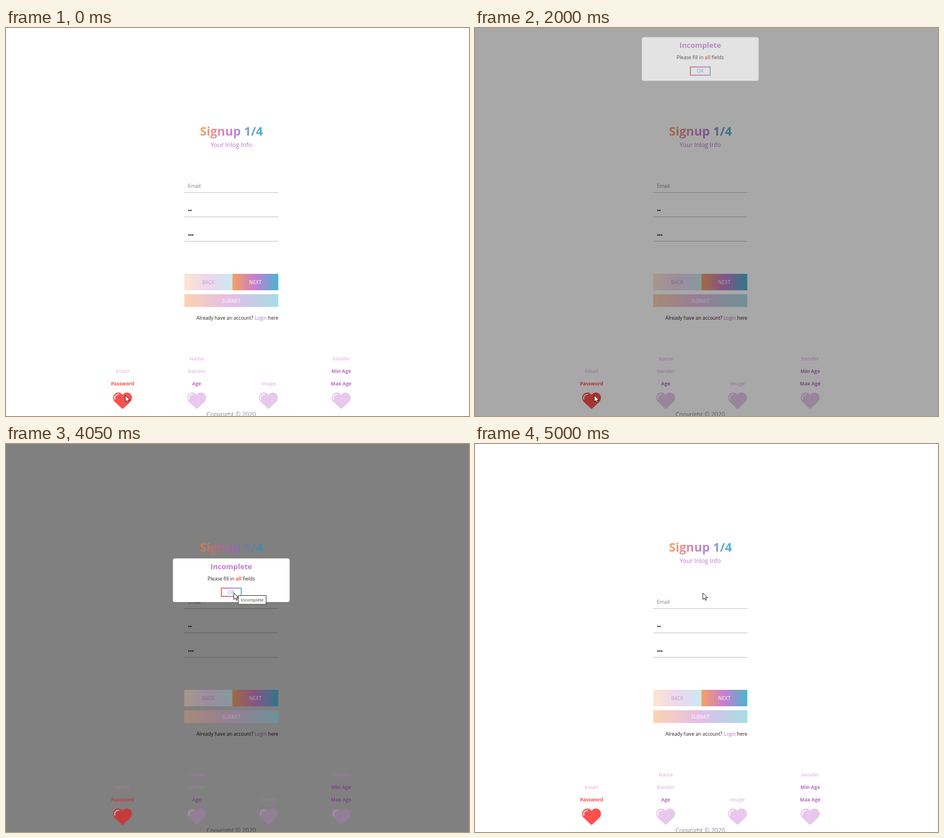
Animation of 817x685 px, one loop 5780 ms. Source, as an HTML page:

```html
<!DOCTYPE html>
<html lang="en">
<head>
<meta charset="utf-8">
<title>Signup</title>
<style>
html, body { margin: 0; width: 100%; height: 100%; overflow: hidden; background: #fff; }
svg { display: block; width: 817px; height: 685px; font-family: "Open Sans", "Noto Sans", sans-serif; }
text { text-anchor: middle; white-space: pre; }
.small { font-size: 8.58px; }
.input { font-size: 8.93px; }
.bold { font-weight: 700; }
.start { text-anchor: start; }
.end { text-anchor: end; }
</style>
</head>
<body>
<svg viewBox="0 0 817 685">
  <defs>
    <g id="heart">
      <path d="M0 4.2C3.5-1.5 10.5-1 14 2.5C18 7 17.3 12.5 13.5 16.5L1.2 28Q0 29-1.2 28L-13.5 16.5C-17.3 12.5-18 7-14 2.5C-10.5-1-3.5-1.5 0 4.2Z"/>
      <path d="M-13.8 11.5C-15 7-11.5 3-7 3" fill="none" stroke="#fff" stroke-width="1.7" stroke-linecap="round"/>
    </g>
    <g id="tip">
      <rect x=".5" y=".5" width="49" height="15.5" fill="#fff" stroke="#3c3c3c"/>
      <text x="25" y="11" font-size="7.6" fill="#444">Incomplete</text>
    </g>
  </defs>

  <rect id="backdrop" width="817" height="685"/>

  <g id="plain">
    <path d="M314.5 290.5h166M314.5 333.5h166M314.5 376.5h166" stroke="#c4c4c4"/>
    <text class="input start" x="321" y="282.3" fill="#857a80">Email</text>
    <g id="dots" fill="#2a1520"></g>
    <text class="end" x="480.5" y="515" font-size="8.5" fill="#2d1a22">Already have an account? <tspan fill="#b66fc4">Login</tspan> here</text>
    <text x="397.5" y="685.5" font-size="10.72" fill="#8a8799">Copyright © 2020</text>
  </g>

  <g id="heading">
    <text class="bold" x="397.7" y="190" font-size="21.44" fill="url(#titleFill)">Signup 1/4</text>
    <text x="397.5" y="210.3" font-size="10.72" fill="#bd74cb">Your Inlog Info</text>
  </g>

  <g id="buttons" class="input">
    <rect x="314.5" y="434" width="85" height="29" fill="url(#backFill)"/>
    <text x="357" y="452" fill="#b9a8be">BACK</text>
    <rect x="399.5" y="434" width="81" height="29" fill="url(#nextFill)"/>
    <text x="440" y="452" fill="#fff" font-weight="500">NEXT</text>
    <rect x="314.5" y="470" width="166" height="22.5" fill="url(#submitFill)"/>
    <text x="397.5" y="484.7" fill="#fff" font-weight="500">SUBMIT</text>
  </g>

  <g id="pale" class="small bold" fill="#e8c8ec"></g>
  <g id="strong" class="small bold" fill="#b56cc5"></g>
  <g id="error" class="small bold" fill="#ff4f4f"></g>
  <use id="hotHeart" href="#heart" x="205.7" y="643.7" fill="#ff4f4f"/>

  <g id="dialog">
    <rect x="294.5" y="202" width="206" height="77" rx="3.5" fill="#fff"/>
    <text class="bold" x="397.5" y="220.8" font-size="13" fill="#c07ad0">Incomplete</text>
    <text class="small" x="397.5" y="241" fill="#33222a">Please fill in <tspan class="bold" fill="#e8603c">all</tspan> fields</text>
    <rect id="okFrame" fill="none"/>
    <text x="397.6" y="265" font-size="9.4" fill="#86a8d2">OK</text>
  </g>

  <use id="tooltip" href="#tip"/>
  <circle id="click" r="8.4" fill="#ffdf00" fill-opacity=".6"/>
  <path id="cursor" d="M0 0V11.5L2.7 9L4.6 13L6.4 12.2L4.6 8.4H8.2Z" fill="#fff" stroke="#111" stroke-width=".9"/>
</svg>
<script>
const LOOP = 5780;
const OPEN = 1800, CLOSE = 4474, SLIDE = 500, TRAVEL = 585;
const SVG = 'http://www.w3.org/2000/svg';
const $ = id => document.getElementById(id);

function add(parent, tag, attrs, text = '') {
  const el = document.createElementNS(SVG, tag);
  for (const name in attrs) el.setAttribute(name, attrs[name]);
  el.textContent = text;
  parent.append(el);
  return el;
}

function set(id, attrs) {
  for (const name in attrs) $(id).setAttribute(name, attrs[name]);
}

function gradient(id, x1, x2, colors) {
  const el = add(document.querySelector('defs'), 'linearGradient',
    { id, x1, x2, y1: 0, y2: 0, gradientUnits: 'userSpaceOnUse' });
  colors.forEach((color, i) =>
    add(el, 'stop', { offset: i / (colors.length - 1), 'stop-color': color }));
}

gradient('titleFill', 343, 453, ['#f8a060', '#c77fd2', '#45b4d0']);
gradient('backFill', 314.5, 399.5, ['#fde5d0', '#edd6f0', '#cbe9f2']);
gradient('nextFill', 399.5, 480.5, ['#f6a15f', '#c77dd0', '#48b5d0']);
gradient('submitFill', 314.5, 480.5, ['#fcd3af', '#e3bde8', '#a6dde4']);
gradient('okFill', 379, 416, ['#e07f60', '#c77fd0', '#7cb6d4']);
gradient('okPressed', 378, 417, ['#d0a080', '#a58fc8', '#6aabd6']);

// Labels are stacked above each heart, lowest one last.
const steps = [
  [205.7, [['Email', 'pale'], ['Password', 'error']]],
  [336.5, [['Name', 'pale'], ['Gender', 'pale'], ['Age', 'strong']]],
  [463.2, [['Image', 'pale']]],
  [591.5, [['Gender', 'pale'], ['Min Age', 'strong'], ['Max Age', 'strong']]]
];
steps.forEach(([x, labels], i) => {
  labels.forEach(([label, group], row) =>
    add($(group), 'text', { x, y: 631.2 - 22 * (labels.length - 1 - row) }, label));
  if (i) add($('pale'), 'use', { href: '#heart', x, y: 643.7 });
});

[[322, 2], [365.5, 3]].forEach(([cy, count]) => {
  for (let i = 0; i < count; i++) add($('dots'), 'circle', { cx: 322.9 + 3.3 * i, cy, r: 1.25 });
});

const clamp = x => Math.min(1, Math.max(0, x));
const smooth = x => x * x * (3 - 2 * x);

// CSS "ease": cubic-bezier(.25, .1, .25, 1)
function ease(x) {
  if (x <= 0 || x >= 1) return clamp(x);
  const bezier = (a, b, s) => 3 * a * s * (1 - s) ** 2 + 3 * b * s * s * (1 - s) + s ** 3;
  let low = 0, high = 1;
  for (let i = 0; i < 24; i++) {
    const mid = (low + high) / 2;
    if (bezier(.25, .25, mid) < x) low = mid; else high = mid;
  }
  return bezier(.1, 1, low);
}

const hold = (t, start) => start + 80 * Math.floor((t - start) / 80);

function dialogAmount(t) {
  if (t < 1840) return 0;
  if (t < 4520) return ease((hold(t, 1840) - OPEN) / SLIDE);
  return 1 - ease((hold(t, 4520) - CLOSE) / SLIDE);
}

function cursorAt(t) {
  if (t < 2940) return [210.5, 648.5];
  if (t < 3570) {
    const k = smooth(clamp((Math.floor((t - 2940) / 78.5) + 1) / 8));
    return [210.5 + 189.5 * k, 648.5 - 387.5 * k];
  }
  if (t < 3650) return [403.5, 254];
  if (t < 3810) return [402.5, 253.5];
  if (t < 3890) return [402, 260];
  return [402, 263];
}

function tooltipOpacity(t) {
  if (t < 2940) return t < 2320 ? 0 : t < 2400 ? .5 : 1;
  if (t < 4360) return t < 3970 ? 0 : t < 4050 ? .5 : 1;
  return 0;
}

function render(t) {
  const amount = dialogAmount(t);
  const light = 1 - amount / 2;
  const dim = (id, settled) => {
    $(id).style.filter = amount ? `brightness(${amount === 1 ? settled : light})` : 'none';
  };
  const level = Math.round(255 * light);
  set('backdrop', { fill: `rgb(${level},${level},${level})` });
  dim('plain', .5);
  dim('heading', .8);
  dim('buttons', .66);
  dim('pale', .63);
  dim('strong', .66);
  dim('error', .78);
  dim('hotHeart', t < 2940 ? .5 : .76);

  set('dialog', { opacity: amount, transform: `translate(0 ${-TRAVEL * (1 - amount)})` });
  const pressed = t >= 4360;
  set('okFrame', pressed
    ? { x: 379.25, y: 254.25, width: 36.5, height: 15.5, stroke: 'url(#okPressed)', 'stroke-width': 2.5 }
    : { x: 380, y: 254.5, width: 35, height: 14.5, stroke: 'url(#okFill)', 'stroke-width': 2 });

  const [x, y] = cursorAt(t);
  set('cursor', { transform: `translate(${x} ${y})` });
  const clicking = (t >= 1680 && t < 1840) || (t >= 4360 && t < 4520);
  set('click', { cx: x, cy: y - .5, opacity: clicking ? 1 : 0 });
  const [tipX, tipY] = t < 2940 ? [217, 658] : [409.5, 267];
  set('tooltip', { x: tipX, y: tipY, opacity: tooltipOpacity(t) });
}

const begin = performance.now();
function tick() {
  render((performance.now() - begin) % LOOP);
  requestAnimationFrame(tick);
}
render(0);
requestAnimationFrame(tick);
</script>
</body>
</html>
```
